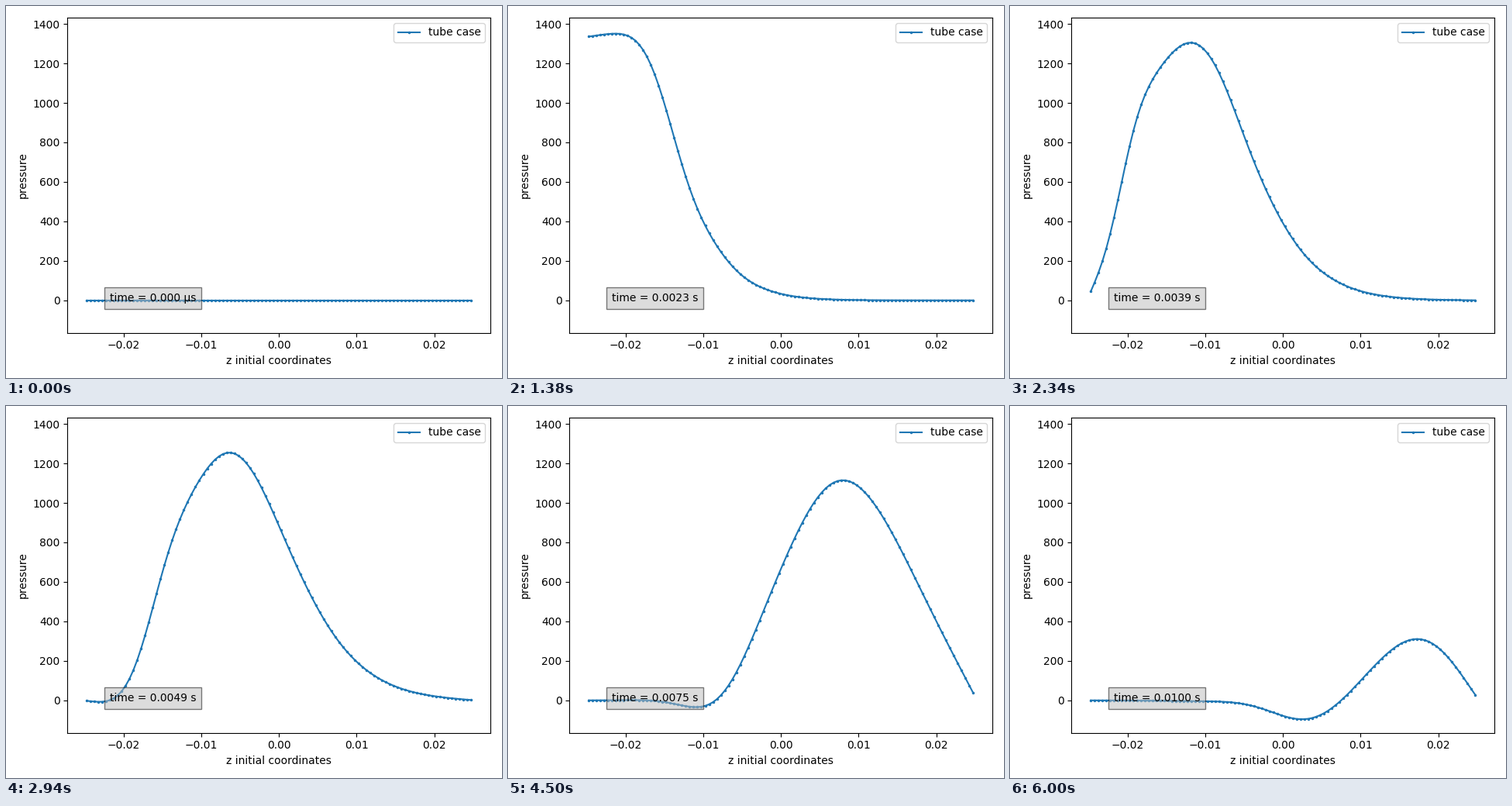
Animation, 640 px wide and 480 px high, one loop 6060 ms. Source, as a matplotlib script:

```python
import numpy as np
import matplotlib.pyplot as plt
from matplotlib.animation import FuncAnimation

W, H, DPI = 640, 480, 100
FRAMES, INTERVAL = 101, 60

# Elastic tube (SI units): a pressure pulse enters on the left, the right end is open
N, LENGTH, DT = 100, 0.05, 1e-4
RADIUS, WALL = 0.005, 0.001
YOUNG, POISSON = 3e5, 0.3
RHO_FLUID, RHO_WALL = 1000.0, 1200.0
PULSE, PULSE_STEPS = 1333.2, 30
SMOOTHING = 0.75

DZ = LENGTH / N
z = (np.arange(N) + 0.5) * DZ - LENGTH / 2


def band(offset):
    return np.eye(N, k=offset) + np.eye(N, k=-offset)


def wall_matrix():
    """Implicit stiffness of the clamped wall: inertia, bending, hoop tension."""
    second = (band(1) - band(0)) / DZ**2
    fourth = (band(2) - 4 * band(1) + 3 * band(0)) / DZ**4
    plate = WALL * YOUNG / (1 - POISSON**2)
    bend = plate * WALL**2 / 12
    hoop = plate / RADIUS**2 + bend / RADIUS**4
    mass = RHO_WALL * WALL / DT**2
    return ((mass + hoop) * np.eye(N)
            - 2 * POISSON * bend / RADIUS**2 * second
            + bend * fourth)


def simulate():
    """Pressure in every cell for every time step."""
    flex = np.linalg.inv(wall_matrix())
    mass = RHO_WALL * WALL / DT**2
    div = (np.eye(N, N + 1, 1) - np.eye(N, N + 1)) / DZ
    grad = (np.eye(N + 1, N) - np.eye(N + 1, N, -1)) / DZ
    step = DT / RHO_FLUID

    history = np.zeros((FRAMES, N))
    bulge = np.zeros(N)
    last_bulge = np.zeros(N)
    vel = np.zeros(N + 1)
    for n in range(1, FRAMES):
        inlet = np.zeros(N + 1)
        if n <= PULSE_STEPS:
            inlet[0] = -PULSE / DZ
        free = flex @ (mass * (2 * bulge - last_bulge))
        new_bulge, new_vel = bulge, vel
        for _ in range(4):
            area = np.pad((RADIUS + new_bulge)**2, 1,
                          constant_values=RADIUS**2)
            face = (area[1:] + area[:-1]) / 2
            carried = np.zeros(N + 1)
            carried[1:] = new_vel[1:] * np.diff(new_vel) / DZ
            guess = vel - DT * carried
            swell = (2 * RADIUS + new_bulge + bulge) / DT
            flow = (face + SMOOTHING * RADIUS**2) * step
            system = swell[:, None] * flex - div @ (flow[:, None] * grad)
            rhs = -swell * (free - bulge) - div @ (face * guess - flow * inlet)
            p = np.linalg.solve(system, rhs)
            new_bulge = flex @ p + free
            new_vel = guess - step * (grad @ p + inlet)
        last_bulge, bulge, vel = bulge, new_bulge, new_vel
        history[n] = p
    return history


pressure = simulate()

fig, ax = plt.subplots(figsize=(W / DPI, H / DPI), dpi=DPI)
line, = ax.plot(z, pressure[0], marker=".", markersize=3, label="tube case")
ax.set_xlim(-0.027225, 0.027225)
ax.set_ylim(-164.6, 1431.8)
ax.set_xticks(np.arange(-2, 3) / 100)
ax.set_xlabel("z initial coordinates")
ax.set_ylabel("pressure")
ax.legend(loc="upper right")
clock = ax.text(0.1, 0.1, "", transform=ax.transAxes,
                bbox=dict(facecolor="0.73", edgecolor="black",
                          alpha=0.5, pad=5))
fig.tight_layout()


def draw(n):
    line.set_ydata(pressure[n])
    clock.set_text(f"time = {n * DT:.4f} s" if n else "time = 0.000 µs")
    return line, clock


anim = FuncAnimation(fig, draw, frames=FRAMES, interval=INTERVAL,
                     init_func=lambda: draw(0), repeat=True, repeat_delay=0)
plt.show()
```
